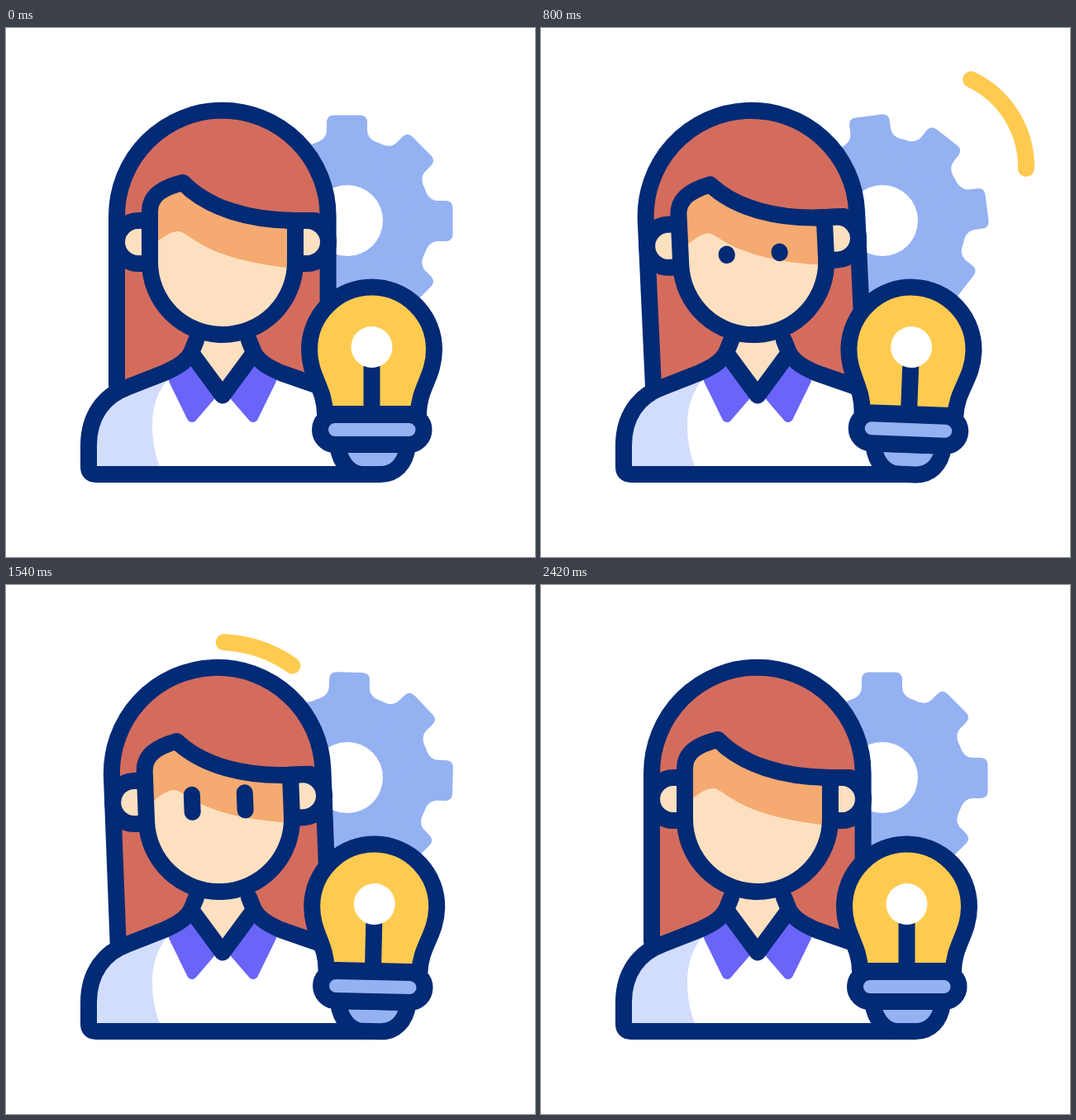
An HTML page that plays this animation: 640x640 px, repeating every 2660 ms.

```html
<!DOCTYPE html>
<html lang="en">
<head>
<meta charset="utf-8">
<title>Bright idea</title>
<style>
  html, body { margin: 0; width: 100%; height: 100%; overflow: hidden; background: #fff; }
  svg { display: block; width: 100vw; height: 100vh; }
  .line { fill: none; stroke: #022a75; stroke-width: 20; stroke-linecap: round; stroke-linejoin: round; }
  .glow { fill: none; stroke: #fecb50; stroke-width: 20; stroke-linecap: round; }
  .hair { fill: #d46c5e; }
  .skin { fill: #fde0c0; }
  .shade { fill: #f4aa70; }
  .blue { fill: #94b1f2; }
  .yellow { fill: #fecb50; }
  .white { fill: #fff; }
  .collar { fill: #6a64f8; stroke: #6a64f8; stroke-width: 12; stroke-linejoin: round; }
</style>
</head>
<body>
<svg viewBox="0 0 640 640">
  <defs>
    <path id="tooth" d="M-34 -96Q-24.5 -101 -24.5 -110V-119Q-24.5 -128 -15.5 -128H15.5Q24.5 -128 24.5 -119V-110Q24.5 -101 34 -96L0 -60Z"/>
    <path id="face" d="M174 222C174 202 190 193 214 187C244 218 295 233 350 233V283A88 88 0 0 1 174 283Z"/>
    <clipPath id="faceClip"><use href="#face"/></clipPath>
  </defs>

  <g id="gear" class="blue"><circle r="102"/></g>
  <circle class="white" cx="413" cy="233" r="43"/>
  <path id="sweep" class="glow"/>
  <g id="rays"></g>

  <g id="back">
    <path id="halo" class="glow"/>
    <path class="line hair" d="M134 432V227.5A127.8 127.8 0 0 1 389.6 227.5V432"/>
  </g>

  <path class="white" d="M100 540V505C100 470 118 445 146 435L192 417C215 408 222 394 230 378H294C302 394 309 408 332 417L390 437L440 470V540Z"/>
  <path fill="#d2dcfc" d="M108 535V505C108 470 125 447 150 438L198 422C183 439 177 458 177 480C177 502 181 519 188 535Z"/>
  <path class="collar" d="M203 426L222 405L250 442L225 471Z"/>
  <path class="collar" d="M321 426L302 405L274 442L299 471Z"/>
  <path class="skin" d="M231 368H293L300 393L262 440L224 393Z"/>
  <path class="line" d="M230 378L224 393L262 444.500L300 393L294 378"/>
  <path class="line" d="M440 540H109Q100 540 100 531V505C100 470 118 445 146 435L192 417C205 411 217 405 224 393M300 393C307 405 319 411 332 417L378 433"/>

  <g id="head">
    <path class="line skin" d="M174 233H160A26 26 0 0 0 160 285H174M350 233H364A26 26 0 0 1 364 285H350"/>
    <use href="#face" class="skin"/>
    <path class="shade" clip-path="url(#faceClip)" d="M170 268C187 256 198 245 210 246C225 250 240 280 350 291V170H170Z"/>
    <use href="#face" class="line"/>
    <path class="line" d="M340 233H374"/>
    <path id="eyes" class="line"/>
  </g>

  <g id="bulb">
    <path class="line blue" d="M401 504C404 528 418 540 432 540H453C470 540 484 528 486 504Z"/>
    <path class="line yellow" d="M386 467C386 436 367 422 367 389A75.500 75.500 0 0 1 518 389C518 422 499 436 499 467Z"/>
    <path class="line" style="stroke-linecap:butt" d="M442.500 405V462"/>
    <circle class="white" cx="442.500" cy="386" r="25"/>
    <rect class="line blue" x="380" y="468" width="125.500" height="36" rx="18"/>
  </g>
</svg>
<script>
  const LOOP = 2660;
  const $ = id => document.getElementById(id);
  const NS = 'http://www.w3.org/2000/svg';

  const add = (parent, tag, attrs) => {
    const el = document.createElementNS(NS, tag);
    for (const k in attrs) el.setAttribute(k, attrs[k]);
    return parent.appendChild(el);
  };

  const clamp = u => Math.min(1, Math.max(0, u));
  const linear = u => u;
  const smooth = u => u * u * (3 - 2 * u);
  const ramp = (t, from, to) => smooth(clamp((t - from) / (to - from)));

  // Each key is [time, value].
  function track(keys, t, ease) {
    if (t <= keys[0][0]) return keys[0][1];
    for (let i = 1; i < keys.length; i++) {
      const [t0, a] = keys[i - 1], [t1, b] = keys[i];
      if (t < t1) return a + (b - a) * ease((t - t0) / (t1 - t0));
    }
    return keys[keys.length - 1][1];
  }

  const HEAD = [[180, 0], [553, 3.3], [927, -4.8], [1300, 3.2], [1673, -4.4], [2420, 0]];
  const BULB = [[180, 0], [553, -5], [927, 4.8], [1300, -5.1], [1673, 3.9], [2420, 0]];
  const GEAR = [[160, 0], [300, -21.5], [640, -69], [1000, -132.5], [1300, -175.5], [1820, -279.6], [2340, -360]];

  const polar = (cx, cy, r, deg) => {
    const a = deg * Math.PI / 180;
    return (cx + r * Math.cos(a)).toFixed(2) + ' ' + (cy + r * Math.sin(a)).toFixed(2);
  };

  const show = (el, on) => el.setAttribute('visibility', on ? 'visible' : 'hidden');

  // Draws the part of an arc between its trimmed tail and tip.
  function arc(el, cx, cy, r, from, to, tail, tip) {
    const span = to - from;
    show(el, tip > 0 && tail < 1);
    el.setAttribute('d', 'M' + polar(cx, cy, r, from + span * tail) +
      'A' + r + ' ' + r + ' 0 0 1 ' + polar(cx, cy, r, from + span * tip + 0.01));
  }

  for (let i = 0; i < 8; i++) {
    add($('gear'), 'use', { href: '#tooth', transform: `rotate(${i * 45})` });
  }

  const rays = [[-83, 320], [-52, 260], [-20, 320]].map(([angle, start]) =>
    ({ angle, start, el: add($('rays'), 'path', { class: 'glow' }) }));

  function draw(t) {
    $('gear').setAttribute('transform', `translate(412.500 233.500) rotate(${track(GEAR, t, linear)})`);

    const tilt = `rotate(${track(HEAD, t, smooth)} 262 388)`;
    $('back').setAttribute('transform', tilt);
    $('head').setAttribute('transform', tilt);
    $('bulb').setAttribute('transform', `rotate(${track(BULB, t, smooth)} 442.500 532)`);

    // The eyes grow upwards from their lower ends.
    const open = ramp(t, 740, 1110) - ramp(t, 1673, 2047);
    const lid = 273.4 - 21 * open;
    show($('eyes'), open > 0);
    $('eyes').setAttribute('d', `M230 273.5V${lid}M294 273.5V${lid}`);

    for (const { angle, start, el } of rays) {
      const tip = 84 + 37 * ramp(t, start, start + 200);
      const tail = 84 + 37 * ramp(t, 440, 640);
      show(el, t > start && t < 660);
      el.setAttribute('d', 'M' + polar(476, 379, tail, angle) + 'L' + polar(476, 379, tip + 0.01, angle));
    }

    arc($('sweep'), 470, 168, 117, -111.5, 1, ramp(t, 720, 900), ramp(t, 420, 620));
    arc($('halo'), 262, 227.5, 158.5, -127, -53, ramp(t, 1420, 1640), ramp(t, 1120, 1350));
  }

  const begin = performance.now();
  function tick() {
    const t = (performance.now() - begin) % LOOP;
    draw(Math.floor(t / 20) * 20);
    requestAnimationFrame(tick);
  }
  draw(0);
  requestAnimationFrame(tick);
</script>
</body>
</html>
```
